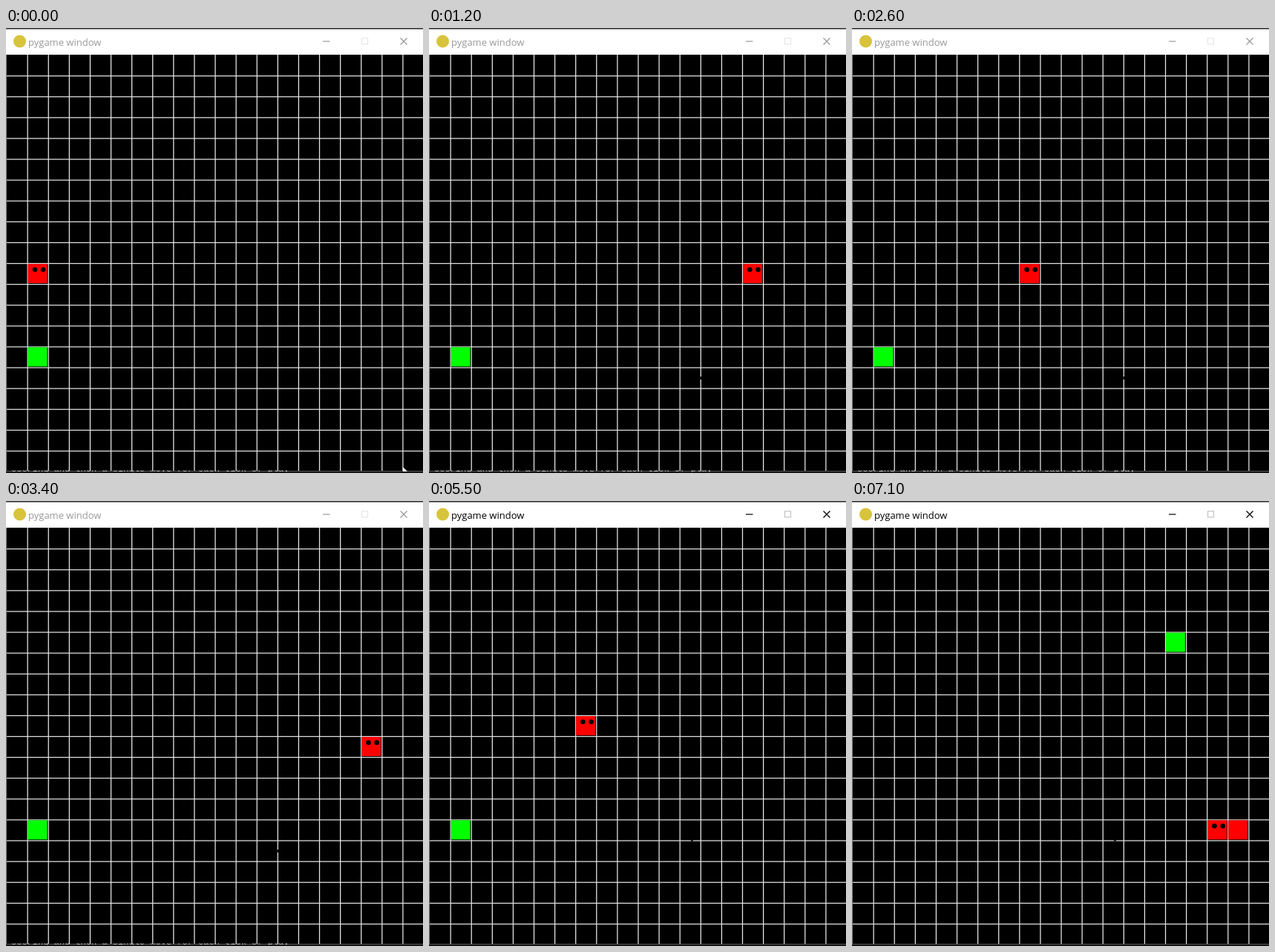
These frames come from a looping animation (562x600 px, 7200 ms). An HTML page with a canvas:

```html
<!DOCTYPE html>
<html lang="en">
<head>
<meta charset="utf-8">
<title>Snake</title>
<style>
  html, body { margin: 0; width: 100%; height: 100%; overflow: hidden; background: #000; }
  canvas { display: block; }
</style>
</head>
<body>
<canvas id="stage" width="562" height="600"></canvas>
<script>
const ctx = document.getElementById('stage').getContext('2d');
const LOOP = 7200, TICK = 100, CELL = 28.1, COLS = 20;
const LEFT = 0.4, TOP = 35.9;
const HELD_TICKS = [5, 15, 25, 36, 46, 56, 66];   // the picture pauses here
const SKIP_STEPS = [12, 30, 51];                  // the snake advances two cells here
const FOCUS_TIME = 4000, EAT_DISTANCE = 67;

const countUpTo = (list, n) => list.filter(v => v <= n).length;

function distanceAt(time) {
  const tick = Math.floor(time / TICK);
  const step = tick - countUpTo(HELD_TICKS, tick);
  return step === 0 ? 1 : step + 4 + countUpTo(SKIP_STEPS, step);
}

// Right along row 10, up and back down column 7, then left along row 14.
function cellAt(d) {
  if (d <= 47) return [d % COLS, 10];
  if (d <= 61) return [7, 5 + Math.abs(d - 52)];
  return [(68 - d + COLS) % COLS, 14];
}

function rect(color, x, y, w, h) {
  ctx.fillStyle = color;
  ctx.fillRect(x, y, w, h);
}

function disc(color, x, y, r) {
  ctx.fillStyle = color;
  ctx.beginPath();
  ctx.arc(x, y, r, 0, 2 * Math.PI);
  ctx.fill();
}

function line(...points) {
  ctx.beginPath();
  for (let i = 0; i < points.length; i += 2) ctx.lineTo(points[i], points[i + 1]);
  ctx.stroke();
}

function drawTitleBar(focused) {
  const ink = focused ? '#000' : '#999';
  rect('#333', 0, 0, 562, 2);
  rect('#fff', 0, 1.6, 562, 34.4);
  disc('#d8c33c', 18.5, 18, 8.5);
  ctx.fillStyle = ink;
  ctx.font = '13px "Open Sans", sans-serif';
  ctx.fillText('pygame window', 30, 24);
  ctx.lineWidth = 1.2;
  ctx.strokeStyle = ink;
  line(427, 18, 436.5, 18);
  line(531.5, 13.5, 540.5, 22.5);
  line(540.5, 13.5, 531.5, 22.5);
  ctx.strokeStyle = focused ? '#c4c4c4' : '#e6e6e6';
  ctx.strokeRect(479.5, 13.8, 8, 8);
}

function drawGrid() {
  for (let i = 1; i < COLS; i++) {
    rect('#e8e8e8', LEFT + i * CELL, 36, 1.25, 562);
    rect('#e0e0e0', 0, TOP + i * CELL, 562, 1.25);
  }
  rect('#777', 0, 36, 1, 562);
  rect('#555', 0, 597, 562, 1.2);
  rect('#161616', 0, 598.2, 562, 2);
}

function drawCube(color, [col, row], eyes) {
  const x = LEFT + col * CELL, y = TOP + row * CELL;
  rect(color, x + 1.1, y + 1.2, 25.9, 25.9);
  if (eyes) for (const dx of [10.4, 21.6]) disc('#000', x + dx, y + 8.9, 3.3);
}

// Sliver of a window behind, showing along the bottom edge.
function drawBackground() {
  ctx.save();
  ctx.beginPath();
  ctx.rect(0, 596.4, 562, 2);
  ctx.clip();
  ctx.fillStyle = '#ddd';
  ctx.font = '12px "Liberation Mono", monospace';
  ctx.fillText('scoring and then a single move for each tick of play', 7, 598);
  ctx.restore();
}

function drawPointer(time) {
  if (time < TICK) {
    ctx.fillStyle = '#fff';
    ctx.beginPath();
    ctx.moveTo(535, 592);
    ctx.lineTo(541, 598);
    ctx.lineTo(535, 598);
    ctx.fill();
  } else if (time < FOCUS_TIME) {
    rect('#000', 365.5, 470, 2, 4);
  } else {
    rect('#000', 353, 456.5, 3, 2);
  }
}

function draw(time) {
  const distance = distanceAt(time);
  const eaten = distance >= EAT_DISTANCE;
  const focused = time >= FOCUS_TIME;
  rect('#000', 0, 0, 562, 600);
  drawGrid();
  drawTitleBar(focused);
  if (!focused) drawBackground();
  drawCube('#0f0', eaten ? [15, 5] : [1, 14]);
  if (eaten) drawCube('#f00', cellAt(distance - 1));
  drawCube('#f00', cellAt(distance), true);
  drawPointer(time);
}

const start = performance.now();
function frame() {
  draw((performance.now() - start) % LOOP);
  requestAnimationFrame(frame);
}
frame();
</script>
</body>
</html>
```
